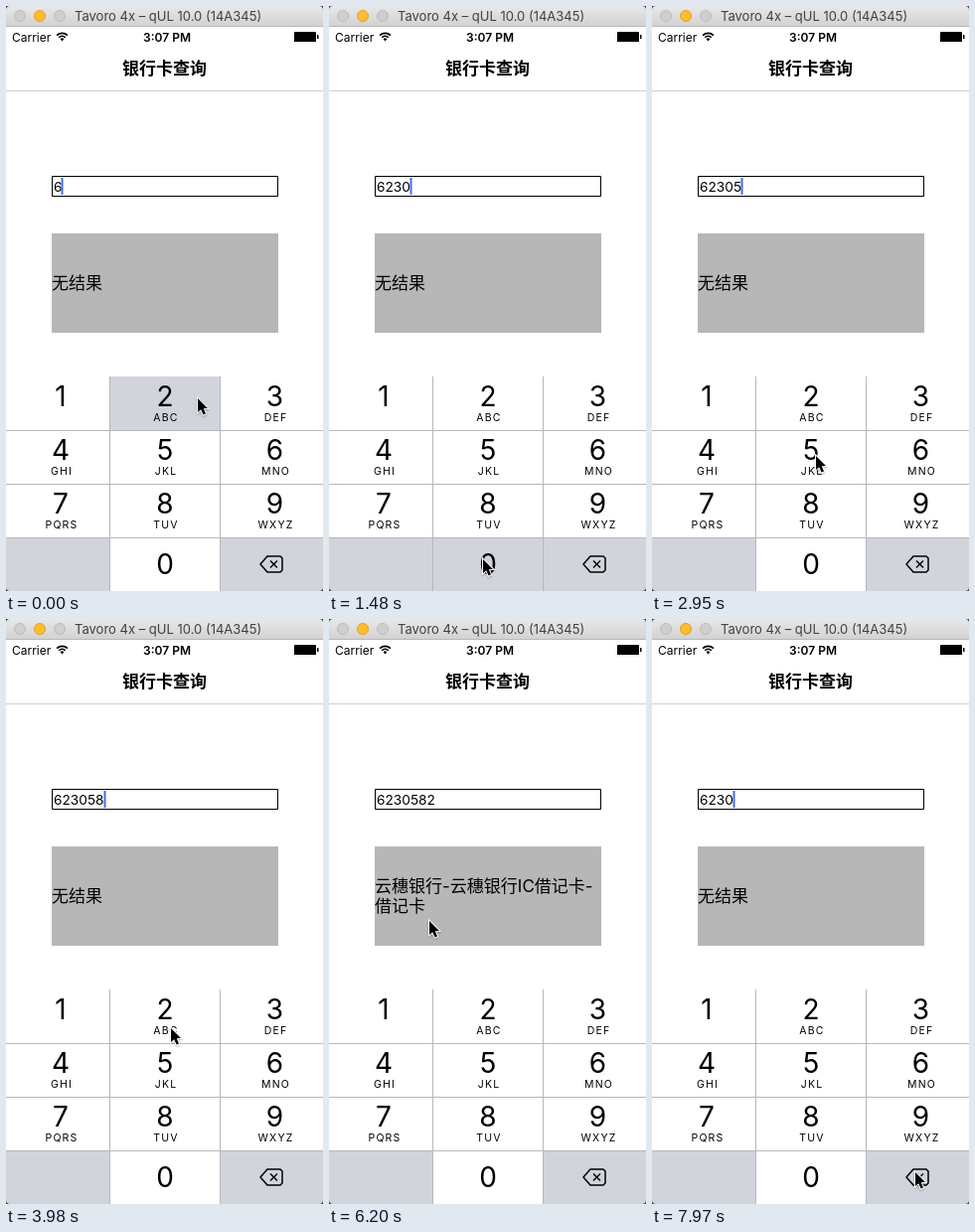
These frames come from a looping animation (319 px wide and 589 px high, 8 s). An HTML page with a canvas:

```html
<!DOCTYPE html>
<html lang="zh">
<head>
<meta charset="utf-8">
<title>银行卡查询</title>
<style>
html, body { margin: 0; width: 100%; height: 100%; overflow: hidden; background: #fff; }
canvas { display: block; width: 319px; height: 589px; }
</style>
</head>
<body>
<canvas id="stage"></canvas>
<script>
const W = 319, H = 589, LOOP = 8000, TICK = 147.5;
const LATIN = 'Inter, "Noto Sans CJK SC", "Noto Sans CJK", sans-serif';
const HAN = 'Inter, "Noto Sans CJK SC", "Noto Sans CJK", sans-serif';
const KEY_GRAY = '#d1d4db';
const COLS = [0, 105, 216, 319], ROWS = [373, 428, 482, 536, 589];
const CENTERS = [55, 160, 270.5];
const LETTERS = ['', 'ABC', 'DEF', 'GHI', 'JKL', 'MNO', 'PQRS', 'TUV', 'WXYZ'];
const NO_RESULT = ['无结果'];
const FOUND = ['云穗银行-云穗银行IC借记卡-', '借记卡'];

// [tick, entered digits]
const TYPED = [[-1, '6'], [1, '62'], [4, '623'], [10, '6230'], [19, '62305'], [25, '623058'],
  [30, '6230582'], [50, '623058'], [52, '62305'], [53, '6230']];

// [first tick, last tick, key]
const PRESSES = [[0, 0, '2'], [3, 3, '3'], [9, 10, '0'], [17, 19, '5'], [24, 25, '8'],
  [29, 30, '2'], [50, 50, 'del'], [52, 53, 'del']];

// [tick, x, y] of the pointer tip
const POINTER = [[0, 193, 395], [1, 196, 395], [2, 232, 396], [3, 262, 400], [4, 256, 408],
  [5, 195, 462], [6, 195, 462], [8, 168, 542], [9, 155, 557], [11, 155, 557], [13, 168, 505],
  [14, 174, 464], [15, 165, 453], [21, 165, 453], [23, 163, 500], [25, 162, 507],
  [27, 166, 412], [28, 166, 402], [34, 166, 402], [36, 201, 368], [38, 120, 308],
  [40, 72, 299], [41, 83, 301], [42, 101, 304], [44, 158, 352], [46, 233, 480],
  [48, 258, 554], [49, 260, 557], [51, 265, 557], [55, 265, 557]];

const canvas = document.getElementById('stage');
const ctx = canvas.getContext('2d');
const dpr = window.devicePixelRatio || 1;
canvas.width = W * dpr;
canvas.height = H * dpr;

function rect(x, y, w, h, color) {
  ctx.fillStyle = color;
  ctx.fillRect(x, y, w, h);
}

function disc(x, y, r, fill, edge) {
  ctx.beginPath();
  ctx.arc(x, y, r, 0, 7);
  ctx.fillStyle = fill;
  ctx.fill();
  if (edge) {
    ctx.strokeStyle = edge;
    ctx.lineWidth = 1;
    ctx.stroke();
  }
}

function text(str, x, y, font, align = 'left', color = '#000') {
  ctx.font = font;
  ctx.textAlign = align;
  ctx.fillStyle = color;
  ctx.fillText(str, x, y);
}

function path(points, close) {
  ctx.beginPath();
  points.forEach(([x, y]) => ctx.lineTo(x, y));
  if (close) ctx.closePath();
}

function pointerAt(tick) {
  const i = Math.max(1, POINTER.findIndex(p => p[0] >= tick));
  const [t0, x0, y0] = POINTER[i - 1], [t1, x1, y1] = POINTER[i];
  const k = (tick - t0) / (t1 - t0);
  return [x0 + (x1 - x0) * k, y0 + (y1 - y0) * k];
}

function drawTitleBar() {
  const g = ctx.createLinearGradient(0, 0, 0, 21);
  g.addColorStop(0, '#e9e8e9');
  g.addColorStop(1, '#d2d1d2');
  rect(0, 0, W, 21, g);
  rect(0, 20, W, 1, '#b9b8b9');
  disc(14, 10, 5.5, '#d0cfd0', '#bcbbbc');
  disc(34, 10, 5.5, '#fdbd2e', '#dfa023');
  disc(54, 10, 5.5, '#d0cfd0', '#bcbbbc');
  text('Tavoro 4x – qUL 10.0 (14A345)', 69, 15, '13px ' + LATIN, 'left', '#404040');
}

function drawStatusBar() {
  text('Carrier', 6, 35.5, '12px ' + LATIN);
  ctx.strokeStyle = '#000';
  ctx.lineWidth = 1.7;
  for (const r of [4.6, 7.6]) {
    ctx.beginPath();
    ctx.arc(56.5, 35, r, -Math.PI * 0.75, -Math.PI * 0.25);
    ctx.stroke();
  }
  ctx.beginPath();
  ctx.moveTo(56.5, 35.5);
  ctx.arc(56.5, 35, 2.6, -Math.PI * 0.75, -Math.PI * 0.25);
  ctx.fillStyle = '#000';
  ctx.fill();
  text('3:07 PM', 162, 35.5, '600 12px ' + LATIN, 'center');
  ctx.lineWidth = 1;
  ctx.strokeRect(290.5, 26.5, 21, 9);
  rect(292, 28, 18, 6, '#000');
  rect(290, 27, 22, 9, '#000');
  rect(313, 29, 1.5, 4, '#000');
}

function drawForm(digits, caretAlpha) {
  text('银行卡查询', 159.5, 69, 'bold 17px ' + HAN, 'center');
  rect(0, 85, W, 1, '#cfcfcf');
  ctx.strokeStyle = '#000';
  ctx.lineWidth = 1;
  ctx.strokeRect(46.5, 171.5, 227, 20);
  text(digits, 48, 186.5, '13.7px ' + LATIN);
  const caretX = Math.round(48 + ctx.measureText(digits).width);
  ctx.globalAlpha = caretAlpha;
  rect(caretX - 0.5, 173, 2, 17, '#426bf2');
  ctx.globalAlpha = 1;

  rect(46, 229, 228, 100, '#b7b7b7');
  const lines = digits.length === 7 ? FOUND : NO_RESULT;
  const top = 285 - (lines.length - 1) * 10;
  lines.forEach((line, i) => text(line, 46, top + i * 20, '17px ' + HAN));
}

function drawDeleteIcon() {
  ctx.strokeStyle = '#000';
  ctx.lineWidth = 1.5;
  ctx.lineJoin = 'round';
  path([[256, 562], [263, 554], [276, 554], [278, 556], [278, 568], [276, 570], [263, 570]], true);
  ctx.stroke();
  path([[266, 558.5], [273, 565.5]]);
  ctx.stroke();
  path([[273, 558.5], [266, 565.5]]);
  ctx.stroke();
}

function drawKey(label, col, row, letters, fill) {
  const x = COLS[col], y = ROWS[row], cx = CENTERS[col];
  rect(x, y, COLS[col + 1] - x, ROWS[row + 1] - y, fill);
  if (label === 'del') return drawDeleteIcon();
  text(label, cx, row === 3 ? 572 : y + 30 - (row > 0), '28px ' + LATIN, 'center');
  ctx.letterSpacing = '1.2px';
  text(letters, cx + 1, y + 45 - (row > 0), '10.5px ' + LATIN, 'center');
  ctx.letterSpacing = '0px';
}

function drawKeypad(pressed) {
  LETTERS.forEach((letters, i) => {
    const label = String(i + 1);
    drawKey(label, i % 3, Math.floor(i / 3), letters, pressed === label ? KEY_GRAY : '#fff');
  });
  drawKey('', 0, 3, '', KEY_GRAY);
  drawKey('0', 1, 3, '', pressed === '0' ? KEY_GRAY : '#fff');
  drawKey('del', 2, 3, '', pressed === 'del' ? '#fff' : KEY_GRAY);
  for (const y of [427, 481, 535]) rect(0, y, W, 1, '#b6b8bb');
  for (const x of [104, 215]) rect(x, 373, 1, 216, '#b6b8bb');
}

function drawPointer([x, y]) {
  ctx.save();
  ctx.translate(x, y);
  path([[0, 0], [0, 14], [3.2, 11.2], [5.6, 16.6], [8, 15.5], [5.7, 10.3], [10, 10]], true);
  ctx.lineJoin = 'miter';
  ctx.shadowColor = 'rgba(0,0,0,0.3)';
  ctx.shadowBlur = 2 * dpr;
  ctx.shadowOffsetY = dpr;
  ctx.strokeStyle = '#fff';
  ctx.lineWidth = 2;
  ctx.stroke();
  ctx.shadowColor = 'transparent';
  ctx.fillStyle = '#000';
  ctx.fill();
  ctx.restore();
}

function drawCorners() {
  ctx.fillStyle = '#333';
  for (const [x, y, sx, sy] of [[0, 0, 1, 1], [W, 0, -1, 1], [0, H, 1, -1], [W, H, -1, -1]]) {
    ctx.beginPath();
    ctx.moveTo(x, y);
    ctx.lineTo(x + 4 * sx, y);
    ctx.quadraticCurveTo(x, y, x, y + 4 * sy);
    ctx.fill();
  }
}

function draw(now) {
  // The screen refreshes in even steps.
  const tick = Math.floor((now % LOOP + 10) / TICK);
  const [since, digits] = TYPED.filter(e => e[0] <= tick).pop();
  const press = PRESSES.find(p => tick >= p[0] && tick <= p[1]);
  const caretAlpha = [1, 1, 1, 1, 0.65, 0, 0][(tick - since) % 7];

  ctx.setTransform(dpr, 0, 0, dpr, 0, 0);
  rect(0, 0, W, H, '#fff');
  drawTitleBar();
  drawStatusBar();
  drawForm(digits, caretAlpha);
  drawKeypad(press && press[2]);
  drawPointer(pointerAt(tick));
  drawCorners();
}

const start = performance.now();
function frame() {
  draw(performance.now() - start);
  requestAnimationFrame(frame);
}
frame();
</script>
</body>
</html>
```
